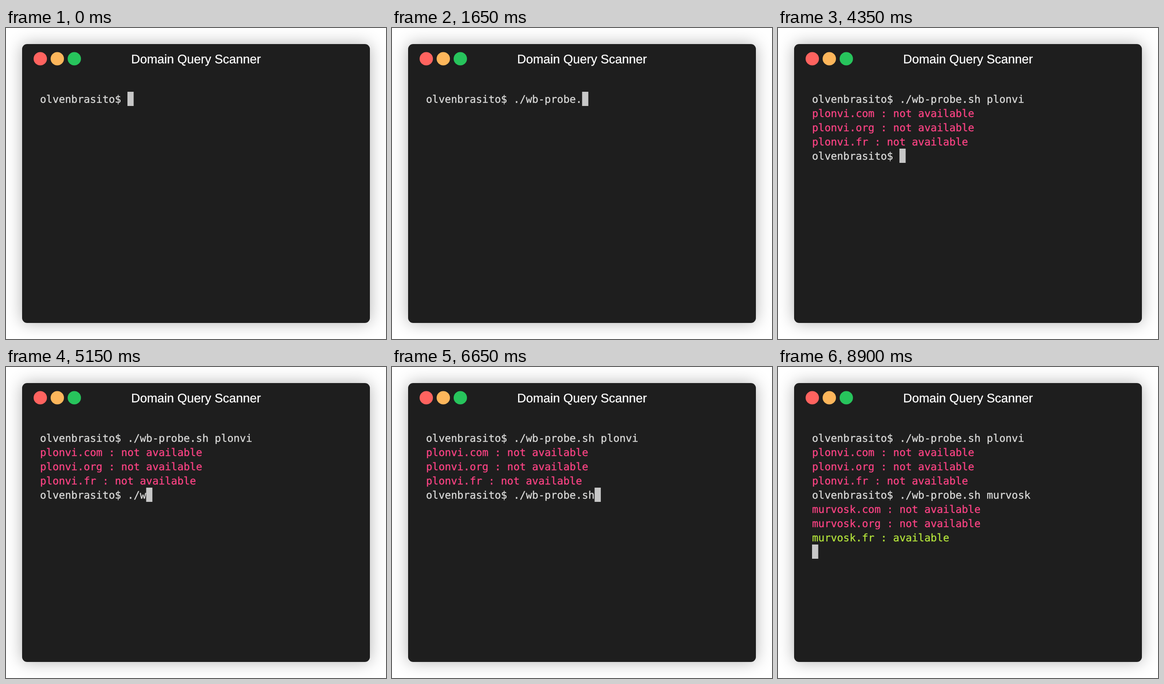
An HTML page that plays this animation: 826x678 px, repeating every 9.9 s.

```html
<!DOCTYPE html>
<html lang="en">
<head>
<meta charset="utf-8">
<title>Terminal</title>
<style>
  html, body { margin: 0; width: 100%; height: 100%; overflow: hidden; background: #fff; }
  #window {
    position: absolute; left: 35px; top: 35px; width: 756px; height: 608px;
    border-radius: 11px; background: #1e1e1e; box-shadow: 0 0 35px rgba(0, 0, 0, .3);
  }
  svg { position: absolute; left: 0; top: 0; }
  text { white-space: pre; text-rendering: geometricPrecision; }
  #title {
    font: 27px "Liberation Sans", Arial, sans-serif; text-anchor: middle;
    fill: #fff; stroke: #fff; stroke-width: .3px;
  }
  #screen { font: 22.54px "DejaVu Sans Mono", monospace; stroke-width: .35px; }
</style>
</head>
<body>
<div id="window"></div>
<svg width="826" height="678">
  <circle cx="74.5" cy="67" r="14.5" fill="#ff635f"/>
  <circle cx="111.5" cy="67" r="14.5" fill="#fdb65b"/>
  <circle cx="148.5" cy="67" r="14.5" fill="#27c45c"/>
  <text id="title" x="413" y="77">Domain Query Scanner</text>
  <g id="screen"></g>
  <rect id="cursor" width="13.5" height="31" fill="#c7c7c7"/>
</svg>
<script>
const LOOP = 9900, KEY = 150, LEFT = 74, TOP = 139, CELL = 13.57, ROW = 31;
const WHITE = '#dbdbda', RED = '#fc4384', GREEN = '#b3e33b';
const PROMPT = 'olvenbrasito$ ';
const FIRST = './wb-probe.sh plonvi', SECOND = './wb-probe.sh murvosk';

const screen = document.getElementById('screen');
const cursor = document.getElementById('cursor');

// [time, text, colour] of each printed result
const firstResults = [
  [3500, 'plonvi.com : not available', RED],
  [3850, 'plonvi.org : not available', RED],
  [4200, 'plonvi.fr : not available', RED]
];
const secondResults = [
  [8200, 'murvosk.com : not available', RED],
  [8550, 'murvosk.org : not available', RED],
  [8900, 'murvosk.fr : available', GREEN]
];

const lines = Array.from({ length: 8 }, (_, i) => {
  const line = document.createElementNS('http://www.w3.org/2000/svg', 'text');
  line.setAttribute('x', LEFT);
  line.setAttribute('y', 163 + i * ROW);
  return screen.appendChild(line);
});

// Characters typed by time t; the last key of a command may come late.
function typed(command, start, t, lastKey = 0) {
  const keys = Math.max(0, Math.floor((t - start) / KEY) + 1);
  const limit = t < lastKey ? command.length - 1 : command.length;
  return PROMPT + command.slice(0, Math.min(keys, limit));
}

function rowsAt(t) {
  const rows = [[typed(FIRST, KEY, t, 3150), WHITE]];
  const print = results => {
    for (const [time, text, colour] of results) if (t >= time) rows.push([text, colour]);
  };
  print(firstResults);
  if (t >= 4350) rows.push([typed(SECOND, 4850, t), WHITE]);
  print(secondResults);
  return rows;
}

function draw(now) {
  const rows = rowsAt(now % LOOP);
  lines.forEach((line, i) => {
    const [text, colour] = rows[i] || ['', WHITE];
    if (line.textContent !== text) line.textContent = text;
    line.setAttribute('fill', colour);
    line.setAttribute('stroke', colour);
  });
  // After a result the cursor waits at the start of the next row.
  const [last, colour] = rows[rows.length - 1];
  const atPrompt = colour === WHITE;
  cursor.setAttribute('x', LEFT + (atPrompt ? last.length * CELL : 0));
  cursor.setAttribute('y', TOP + (rows.length - (atPrompt ? 1 : 0)) * ROW);
}

let start;
function tick(now) {
  start ??= now;
  draw(now - start);
  requestAnimationFrame(tick);
}
draw(0);
requestAnimationFrame(tick);
</script>
</body>
</html>
```
